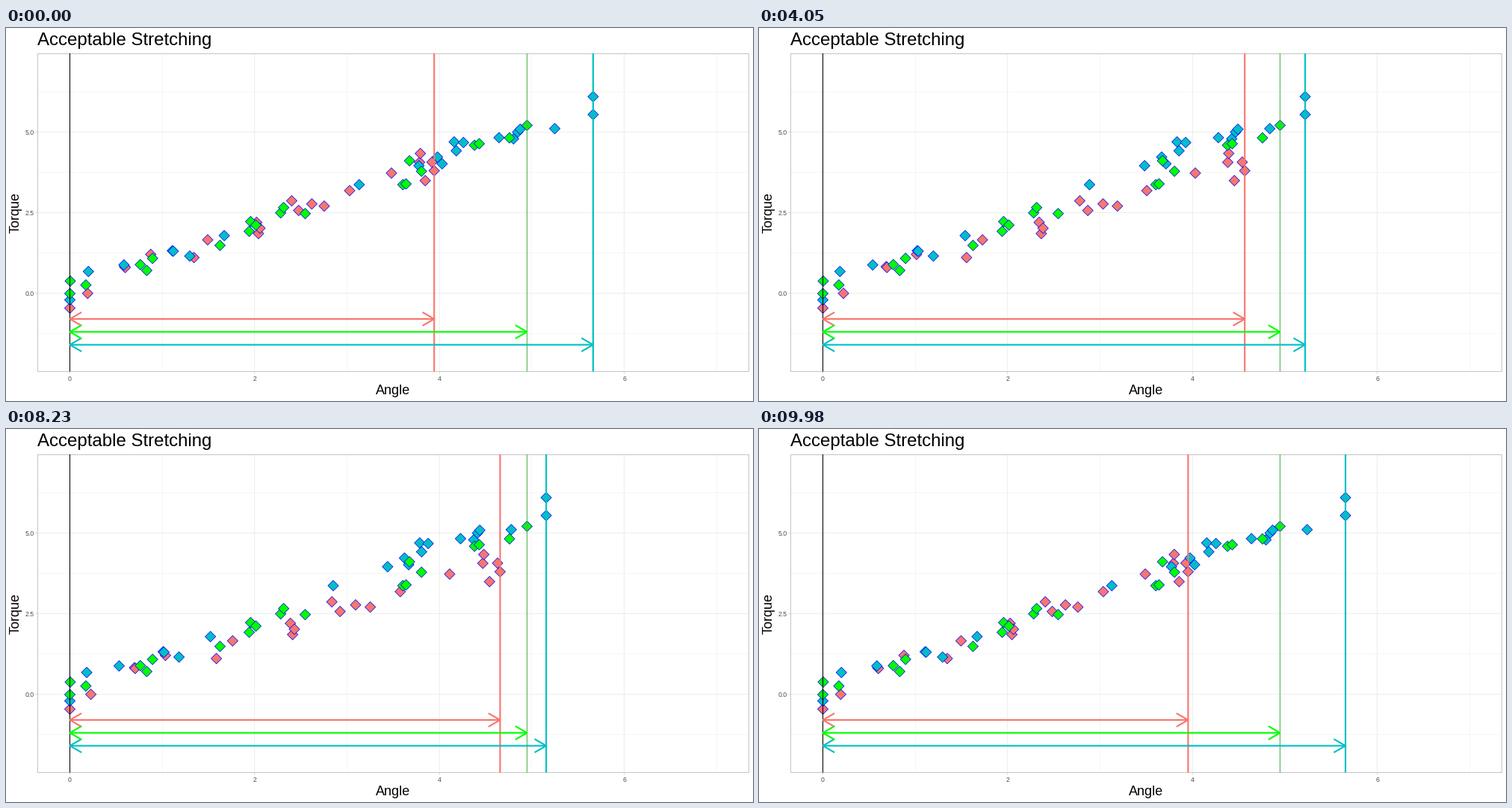
Recreate the animation shown at these times as a matplotlib script. Size 1000 by 500 pixels, loop 10000 ms.

```python
import numpy as np
import matplotlib.pyplot as plt
from matplotlib.animation import FuncAnimation
from matplotlib.collections import LineCollection, PolyCollection
from matplotlib.patches import Rectangle

W, H, DPI = 1000, 500, 100
PT = 72 / DPI                      # points per pixel
FRAMES, INTERVAL = 400, 25

LEFT, RIGHT, TOP, BOTTOM = 42.5, 994.5, 34.5, 460.5
X0, XU = 85.5, 123.67              # pixel of x = 0, pixels per unit
Y0, YU = 355.5, 43.2
END = 697.5                        # common end once everything is stretched

RED, CYAN, GREEN = "#F8766D", "#00BFC4", "#00FF00"

red_pts = np.array([
    (85.5, 375.5), (109.3, 355.7), (158.8, 319.9), (159.6, 321), (193.8, 303.5),
    (251.6, 307.7), (270, 284), (335.5, 260.5), (338, 275.5), (340, 268.4),
    (382.5, 231.7), (391.8, 244.6), (409.4, 235.8), (426, 238.7), (460, 218),
    (516, 194.5), (553.6, 180), (554.7, 168.2), (561.2, 204.6),
    (570.3, 179.8), (573.2, 191.3)])
cyan_pts = np.array([
    (85.5, 364.5), (110.3, 326.4), (157.9, 317.6), (222.7, 298.6), (223.9, 299.2),
    (246, 305.7), (292.2, 278.3), (472.8, 210), (552.8, 184.6), (577.6, 173),
    (583.8, 182), (600, 152.7), (602.8, 164.6), (612.4, 153.5), (660, 147),
    (679.4, 148.6), (685, 139.5), (688.3, 135.7), (734.6, 134.9),
    (786, 92), (786, 116)])
green_pts = np.array([
    (86, 339.2), (85.5, 356), (106.9, 344.5), (179.8, 317.2), (188.4, 325),
    (196.2, 308.8), (286.5, 291.4), (325.6, 272.5), (327.5, 259.5), (334.5, 264.2),
    (367.7, 247.8), (371.7, 240.7), (400.5, 248.8), (531.3, 210), (535.5, 209),
    (540.2, 178), (556.2, 192), (627.2, 157.2), (633.5, 155.1),
    (674, 147.3), (END, 130.5)])

groups = [red_pts, cyan_pts, green_pts]
colors = [RED, CYAN, GREEN]
diamond = 7.13 * np.array([(0, -1), (1, 0), (0, 1), (-1, 0)])

plt.rcParams["font.family"] = "Liberation Sans"
fig = plt.figure(figsize=(W / DPI, H / DPI), dpi=DPI, facecolor="white")
ax = fig.add_axes([0, 0, 1, 1])
ax.set_xlim(0, W)
ax.set_ylim(H, 0)
ax.axis("off")


def px(x):
    return X0 + x * XU


def py(y):
    return Y0 - y * YU


def lines(segs, color, width, z, **kw):
    col = LineCollection(segs, colors=color, linewidths=width * PT, zorder=z, **kw)
    col.set_snap(False)
    return ax.add_collection(col, autolim=False)


def vline(x):
    return [(x, TOP - 0.5), (x, BOTTOM)]


def hline(y):
    return [(LEFT, y), (RIGHT, y)]


def label(x, y, s, size, color="black", **kw):
    ax.text(x, y, s, fontsize=size * PT, color=color, va="baseline", **kw)


def arrow(x, y):
    """Double-headed arrow from zero to x, as three strokes."""
    dx, dy = 15.6, 9
    head = lambda tip, s: [(tip - s * dx, y - dy), (tip, y), (tip - s * dx, y + dy)]
    return [[(X0, y), (x, y)], head(X0, -1), head(x, 1)]


# Grid, frame and ticks
lines([vline(px(v)) for v in (1, 3, 5, 7)] +
      [hline(py(v)) for v in (-1.25, 1.25, 3.75, 6.25)], "#DEDEDE", 0.27, 1)
lines([vline(px(v)) for v in (0, 2, 4, 6)] +
      [hline(py(v)) for v in (0, 2.5, 5)], "#DEDEDE", 0.53, 1)
lines([[(px(v), BOTTOM), (px(v), BOTTOM + 2.75)] for v in (0, 2, 4, 6)] +
      [[(LEFT - 2.75, py(v)), (LEFT, py(v))] for v in (0, 2.5, 5)], "#B3B3B3", 0.53, 1)
ax.add_patch(Rectangle((LEFT, TOP), RIGHT - LEFT, BOTTOM - TOP, fill=False,
                       edgecolor="#C4C4C4", linewidth=PT, zorder=2, snap=False))

# Text
label(42.3, 23, "Acceptable Stretching", 24, ha="left")
label((LEFT + RIGHT) / 2 - 0.5, 491, "Angle", 18, ha="center")
label(18, 247.5, "Torque", 18, ha="center", rotation=90, rotation_mode="anchor")
for v in (0, 2, 4, 6):
    label(px(v), 473, str(v), 8.8, "#4D4D4D", ha="center")
for v in (0, 2.5, 5):
    label(37.5, py(v) + 3.2, f"{v:.1f}", 8.8, "#4D4D4D", ha="right")

# Data layers
points = PolyCollection([diamond], facecolors=np.repeat(colors, [len(g) for g in groups]),
                        edgecolors="#0000FF", linewidths=0.71 * PT, zorder=3)
points.set_snap(False)
ax.add_collection(points, autolim=False)

lines([vline(X0)], "black", 1.07, 4)
lines([vline(END)], "#4FB34F", 1.07, 4)
marks = [lines([], c, 2.13, 5) for c in (RED, CYAN)]
arrows = [lines([], c, 2.13, 6, joinstyle="round") for c in (RED, CYAN)]
lines(arrow(END, py(-1.2)), GREEN, 2.13, 6, joinstyle="round")


def stretch(i):
    """0 at rest, 1 fully stretched; linear ramps between equal holds."""
    return float(np.interp(i, [0, 100, 200, 300, 400], [0, 0, 1, 1, 0]))


def update(i):
    t = stretch(i)
    centres = []
    for g in groups:
        end = g[:, 0].max()
        scale = 1 + t * ((END - X0) / (end - X0) - 1)
        centres.append(np.column_stack([X0 + (g[:, 0] - X0) * scale, g[:, 1]]))
    points.set_verts(np.concatenate(centres)[:, None, :] + diamond)
    for mark, arr, c, y in zip(marks, arrows, centres, (-0.8, -1.6)):
        end = c[:, 0].max()
        mark.set_segments([vline(end)])
        arr.set_segments(arrow(end, py(y)))
    return [points, *marks, *arrows]


anim = FuncAnimation(fig, update, frames=FRAMES, interval=INTERVAL,
                     init_func=lambda: update(0), repeat=True, repeat_delay=0, blit=False)
plt.show()
```
